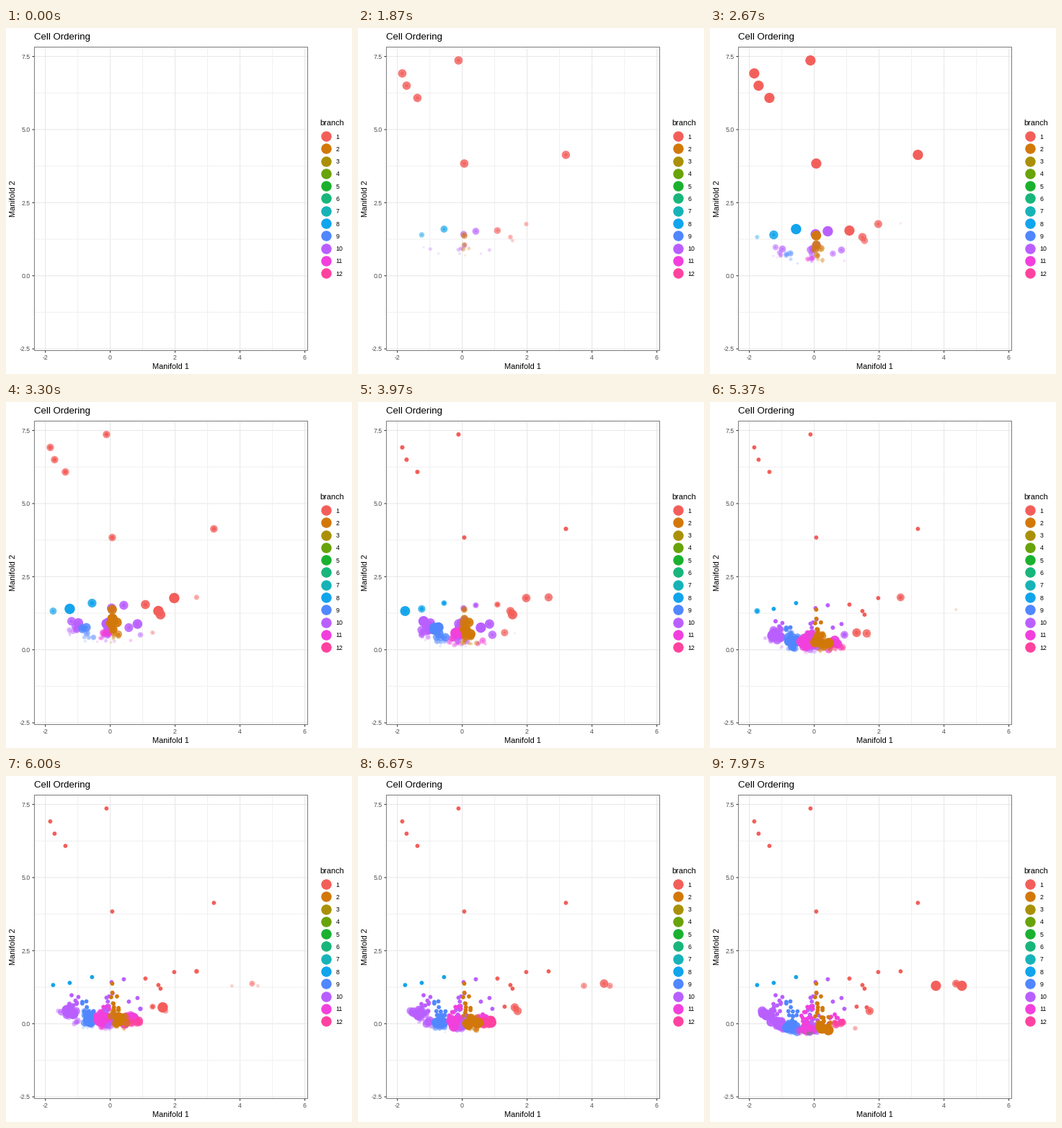
These frames come from a looping animation (480 px wide and 480 px high, 8 s). A matplotlib script:

```python
import numpy as np
import matplotlib.pyplot as plt
from matplotlib.animation import FuncAnimation
from matplotlib.patches import Rectangle

plt.rcParams["font.family"] = "Liberation Sans"

SIZE, DPI = 480, 96
PX = 72 / DPI                          # one pixel in points
LOOP, INTERVAL = 8000, 40
GROW, HOLD = 2000, 300                 # ms to grow (and shrink), ms at full size
R_MIN, R_MAX, R_MARK = 1.3, 7.2, 2.9
LEFT, TOP, RIGHT, BOTTOM = 39.4, 26.5, 418.5, 447.5
SPREAD, SPACING = 5, 200               # cloud width in px, ms between its points

COLORS = ["#f35e5a", "#d27808", "#a99008", "#68a30a", "#1ab12f", "#18b67b",
          "#17b3b7", "#12a4ec", "#5087ff", "#b95fff", "#f140dc", "#ff42a0"]

# Strands of the dense cloud: branch, x from, x to, first and last start in ms.
STRANDS = [
    (10, 102, 75, 1300, 6300),
    (10, 93, 102, 4800, 7400),
    (10, 143, 141, 900, 7700),
    (9, 115, 113, 1500, 7900),
    (11, 134, 132, 1700, 7600),
    (11, 172, 174, 2900, 4300),
    (12, 179, 180, 4200, 5200),
    (5, 137, 135, 7300, 7900),
    (2, 151, 161, 900, 6200),
]

# Isolated points, by branch.
OUTLIERS = {
    10: [(163, 282), (146, 286), (182, 308), (170, 313), (186, 323)],
    8: [(119, 279), (88, 287), (65, 290)],
    2: [(147, 288)],
    1: [(139, 45), (61, 63), (67, 80), (82, 97), (147, 188), (288, 176),
        (193, 281), (211, 290), (214, 295), (233, 272), (264, 271), (203, 320),
        (217, 321), (221, 326), (313, 291), (341, 288), (349, 291), (201, 350)],
}


def sag(x):
    """How much higher the front lies at x than at its lowest point."""
    return 58 * (1 - np.exp(-((x - 148) / 90) ** 4))


def front_y(start, x):
    return 45 + 314 * ((start - 250) / 7650) ** (1 / 11) - sag(x)


def front_time(x, y):
    return 300 + 7600 * np.clip((y + sag(x) - 45) / 314, 0, None) ** 11


def build_points():
    """Rows of x, y, start, branch; points appear where the front passes."""
    rng = np.random.default_rng(7)
    rows = []
    for branch, x0, x1, first, last in STRANDS:
        count = (last - first) // SPACING
        u = (np.arange(count) + rng.uniform(0, 1, count)) / count
        start = first + (last - first) * u
        x = x0 + (x1 - x0) * u + SPREAD * rng.normal(0, 1, count).clip(-1.8, 1.8)
        y = front_y(start, x) + rng.normal(0, 1.5, count)
        rows += [(*p, branch) for p in zip(x, y, start)]
    for branch, points in OUTLIERS.items():
        rows += [(x + 0.4, y, front_time(x, y), branch) for x, y in points]
    return np.array(rows, dtype=float)


def area(radius):
    return (2 * radius * PX) ** 2


def label(x, y, text, size, color="black", **kw):
    ax.text(x, y, text, fontsize=size * PX, color=color, va="baseline", **kw)


def line(xs, ys, color):
    ax.plot(xs, ys, color=color, lw=1.07 * PX, solid_capstyle="butt",
            snap=False, zorder=1)


fig = plt.figure(figsize=(SIZE / DPI, SIZE / DPI), dpi=DPI, facecolor="white")
ax = fig.add_axes([0, 0, 1, 1])
ax.set(xlim=(0, SIZE), ylim=(SIZE, 0))
ax.axis("off")


def draw_chart():
    for i in range(9):
        x, y = 54.6 + 45 * i, 39.5 + 50.7 * i
        major = i % 2 == 0
        color = "#e8e8e8" if major else "#f1f1f1"
        line([x, x], [TOP, BOTTOM], color)
        line([LEFT, RIGHT], [y, y], color)
        if major:
            line([x, x], [BOTTOM, BOTTOM + 3], "#333333")
            line([LEFT - 3, LEFT], [y, y], "#333333")
            label(x - 0.4, 460, f"{i - 2}", 8.8, "#4d4d4d", ha="center")
            label(33.8, y + 3.2, f"{7.5 - 1.25 * i:.1f}", 8.8, "#4d4d4d", ha="right")
    ax.add_patch(Rectangle((LEFT, TOP), RIGHT - LEFT, BOTTOM - TOP, fill=False,
                           ec="#7a7a7a", lw=PX, snap=False, zorder=5))
    label(39, 16, "Cell Ordering", 13.2)
    label(228.5, 473, "Manifold 1", 11, ha="center")
    label(13.3, 237, "Manifold 2", 11, ha="center", rotation=90, rotation_mode="anchor")
    label(435, 135, "branch", 11)
    for i, color in enumerate(COLORS):
        y = 150 + 17.28 * i
        ax.scatter(444, y, s=area(R_MAX), c=color, linewidths=0)
        label(457.6, y + 3.6, str(i + 1), 8.8)


draw_chart()
px, py, start, branch = build_points().T
rgb = np.array([[int(c[k:k + 2], 16) / 255 for k in (1, 3, 5)] for c in COLORS])
rgb = rgb[branch.astype(int) - 1]
marks = ax.scatter(px, py, s=0, linewidths=0, zorder=3)
halos = ax.scatter(px, py, s=0, linewidths=0, zorder=4)


def update(frame):
    age = frame * INTERVAL - start
    grown = np.clip(age / GROW, 0, 1)
    level = np.minimum(grown, np.clip((2 * GROW + HOLD - age) / GROW, 0, 1))
    halos.set_sizes(np.where(level > 0, area(R_MIN + (R_MAX - R_MIN) * level), 0))
    halos.set_facecolors(np.column_stack([rgb, level ** 0.8]))
    marks.set_sizes(area(R_MARK * grown))
    marks.set_facecolors(np.column_stack([rgb, grown]))
    return marks, halos


anim = FuncAnimation(fig, update, frames=LOOP // INTERVAL, interval=INTERVAL,
                     repeat=True, repeat_delay=0, blit=False)
plt.show()
```
